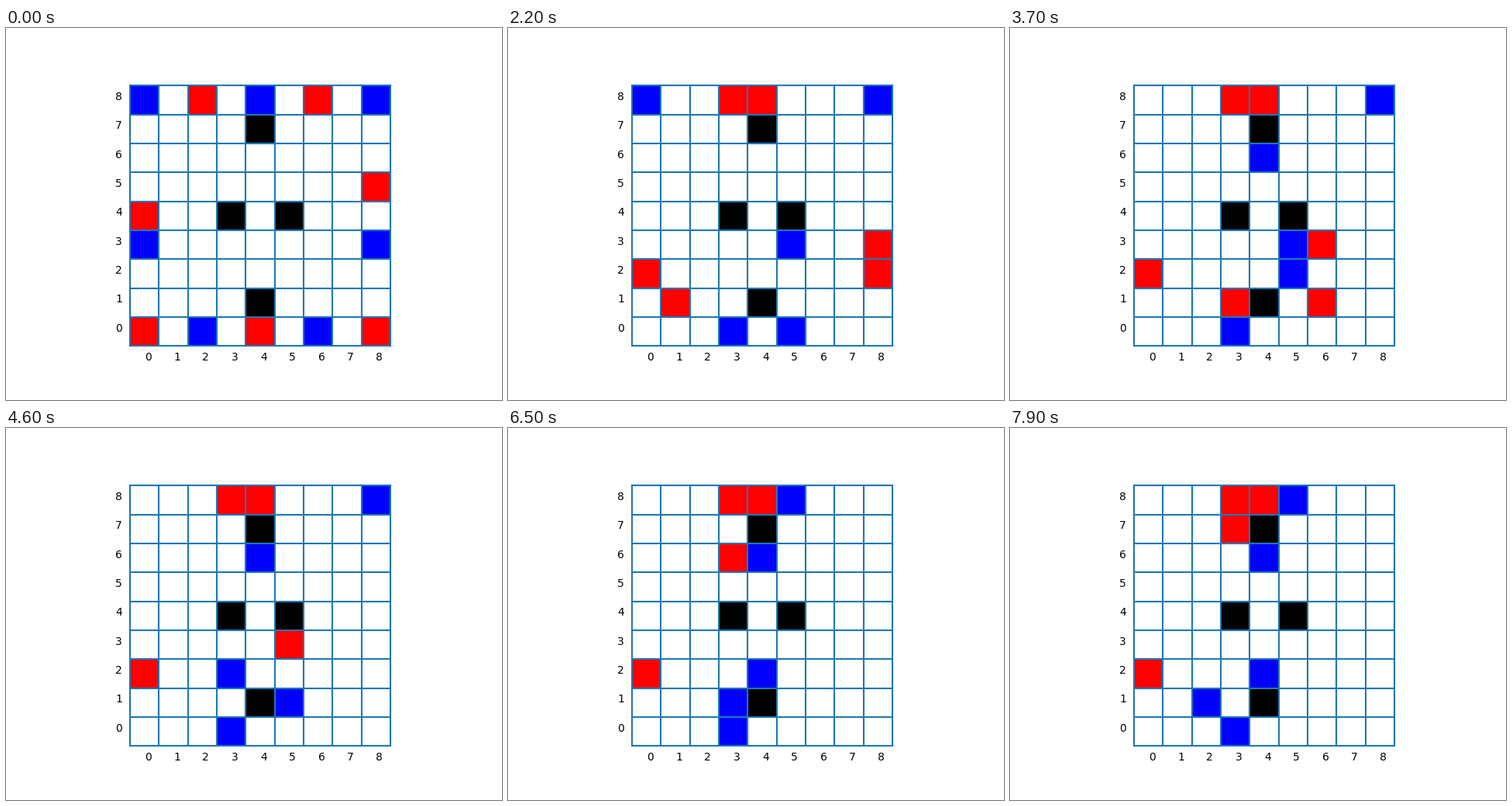
These frames come from a looping animation (640 by 480 pixels, 8 s). A matplotlib script:

```python
import matplotlib.pyplot as plt
from matplotlib.animation import FuncAnimation
from matplotlib.patches import Rectangle

SIZE = 9
PLIES = 80
STEPS = {"L": (-1, 0), "R": (1, 0), "U": (0, 1), "D": (0, -1)}

BLOCKS = "47 34 54 41"
BLUE = "08 48 88 03 83 20 60"
RED = "28 68 85 04 00 40 80"

# Each run is a starting cell followed by single steps; the sides alternate.
BLUE_RUNS = ("20R 60L 03RD 83LD 12DL 72LUL 08DDRRRR 50UU 52D 53LLD "
             "32LD 51UL 21R 88DLLLU 31LRLRLRL")
RED_RUNS = ("85D 80UU 04DD 84D 28R 00RU 68LL 11RR 83LL 82LLD 61UL "
            "63LDULUUL 35UDUDU 36UDUDUDU")
CAPTURES = {3: "40", 15: "01", 20: "48", 40: "52", 45: "31"}


def cell(name):
    return int(name[0]), int(name[1])


def moves(runs):
    for run in runs.split():
        pos = cell(run)
        for step in run[2:]:
            dx, dy = STEPS[step]
            new = pos[0] + dx, pos[1] + dy
            yield pos, new
            pos = new


def play():
    board = {}
    for names, color in ((BLOCKS, "black"), (BLUE, "blue"), (RED, "red")):
        board.update((cell(n), color) for n in names.split())
    sides = moves(RED_RUNS), moves(BLUE_RUNS)
    states = [dict(board)]
    for ply in range(1, PLIES):
        start, end = next(sides[ply % 2])
        board[end] = board.pop(start)
        if ply in CAPTURES:
            del board[cell(CAPTURES[ply])]
        states.append(dict(board))
    return states


states = play()

fig, ax = plt.subplots(figsize=(6.4, 4.8), dpi=100)
ax.set_aspect("equal")
ax.axis("off")

squares = {}
for x in range(SIZE):
    for y in range(SIZE):
        squares[x, y] = ax.add_patch(Rectangle((x, y), 1, 1, fc="white", ec="none"))

for i in range(SIZE + 1):
    ax.plot([i, i], [0, SIZE], color="C0", lw=1.5)
    ax.plot([0, SIZE], [i, i], color="C0", lw=1.5)

for i in range(SIZE):
    ax.text(i + 0.5, -0.5, str(i), fontsize=10)
    ax.text(-0.5, i + 0.5, str(i), fontsize=10)

margin = 0.05 * SIZE
ax.set_xlim(-margin, SIZE + margin)
ax.set_ylim(-margin, SIZE + margin)


def draw(ply):
    for pos, square in squares.items():
        square.set_facecolor(states[ply].get(pos, "white"))
    return list(squares.values())


anim = FuncAnimation(fig, draw, frames=PLIES, interval=100, repeat=True,
                     repeat_delay=0, blit=False)
plt.show()
```
